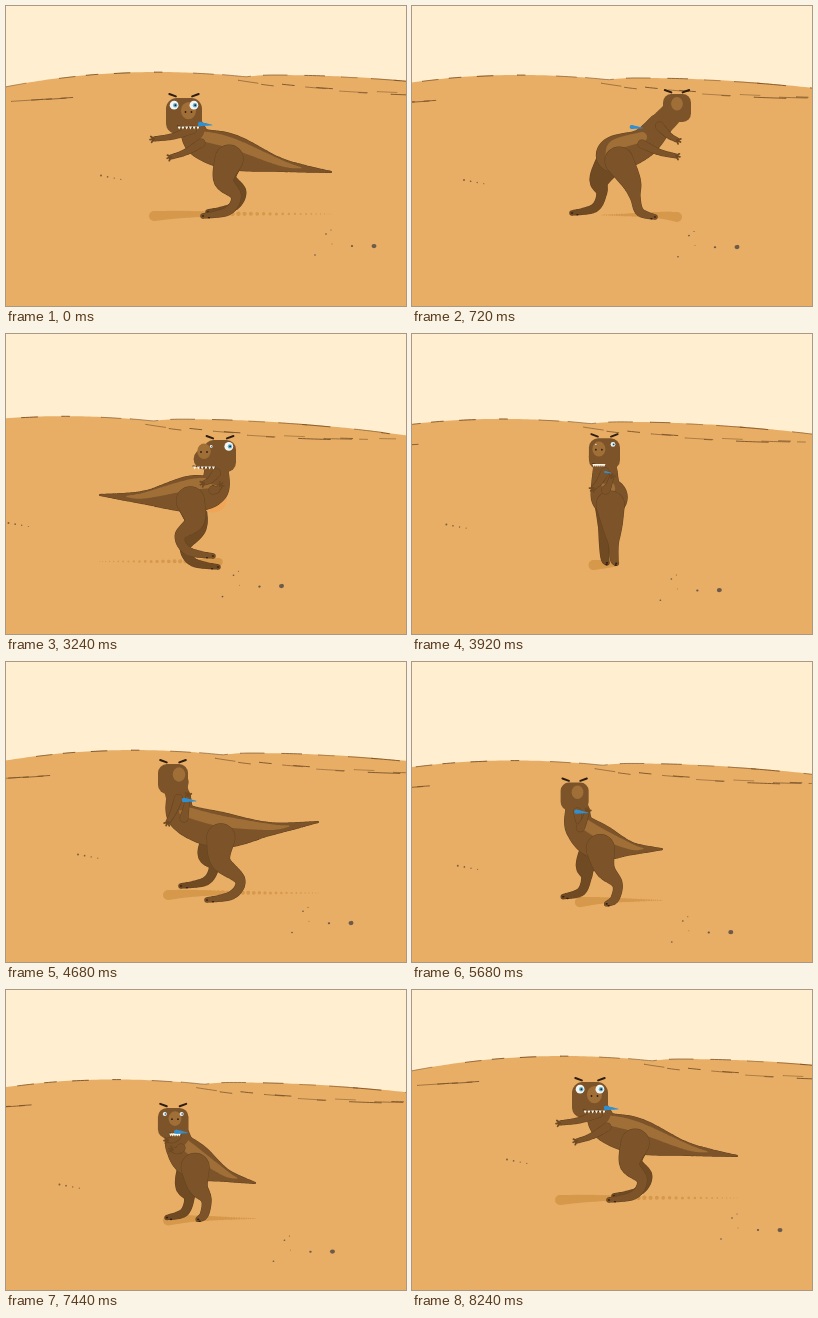
Recreate the animation shown at these times as an HTML page with a canvas. Size 400x300 px, loop 8280 ms.

```html
<!DOCTYPE html>
<html lang="en">
<head>
<meta charset="utf-8">
<title>Dinosaur in the desert</title>
<style>
html,body{margin:0;width:100%;height:100%;overflow:hidden;background:#ffeed0}
canvas{display:block;width:400px;height:300px}
</style>
</head>
<body>
<canvas id="stage" width="400" height="300"></canvas>
<script>
const LOOP = 8280, STEP = 40;
const ctx = document.getElementById('stage').getContext('2d');
const C = {sky:'#ffeed0', sand:'#e8ae66', shade:'#d6994b', ink:'#63421f', skin:'#7d5429',
  dark:'#704a23', light:'#a06f38', belly:'#f0a656', blue:'#2f8fd0', brow:'#2f1d10'};

// A pose holds only the free joints; the rig works out the rest.
// head: x, y, size. feet: toe x, y, facing. gaze: how open each eye is. pan: camera shift.
const faceLeft = {tail:[325,166], hip:[225,146], chest:[195,137], head:[178,110,18], look:[.25],
  near:[197,210,-1], far:[202,206,-1], hands:[148,133,165,151], bite:[200,118,1],
  gaze:[1,1], belly:[0], pan:[0,0]};
const turned = {tail:[190,150], hip:[203,148], chest:[230,138], head:[265,102,14], look:[0],
  near:[243,211,.6], far:[160,207,-.9], hands:[265,134,264,150], bite:[225,121,.9],
  gaze:[0,0], belly:[1], pan:[-43,1]};
const faceRight = {tail:[95,166], hip:[192,149], chest:[222,141], head:[226,112,15], look:[-.8],
  near:[219,214,1], far:[214,208,1], hands:[255,138,238,150], bite:[215,123,1],
  gaze:[0,0], belly:[0], pan:[-87,-3]};
const lookBack = {tail:[94,161], hip:[183,160], chest:[207,156], head:[214,122,16], look:[-1],
  near:[207,222,1], far:[212,233,1], hands:[198,149,214,152], bite:[206,138,0],
  gaze:[.3,1], belly:[8], pan:[-92.5,12]};
const neckUp = {tail:[312,160], hip:[215,168], chest:[178,156], head:[167,117,15], look:[.4],
  near:[201,238,-1], far:[175,224,-1], hands:[162,160,182,134], bite:[184,138,1],
  gaze:[0,0], belly:[0], pan:[-23,21]};
const rear = {tail:[184,216], hip:[157,192], chest:[158,176], head:[158,153,13], look:[0],
  near:[188,246,.4], far:[126,246,-.4], hands:[174,165,168,167], bite:[155,162,.9],
  gaze:[0,0], belly:[0], pan:[-77,40]};
const keys = [[0,faceLeft],[720,turned],[2160,faceRight],[3240,lookBack],[4680,neckUp],[6720,rear],[8240,faceLeft]];

const mix = (a, b, u) => a + (b - a) * u;
const between = (p, q, u) => [mix(p[0], q[0], u), mix(p[1], q[1], u)];
const move = (p, x, y) => [p[0] + x, p[1] + y];
const ease = u => u * u * (3 - 2 * u);

function poseAt(t) {
  const i = Math.max(1, keys.findIndex(k => k[0] > t)), end = t >= 8240 ? keys.length - 1 : i;
  const [t0, a] = keys[end - 1], [t1, b] = keys[end];
  const u = ease(Math.min(1, (t - t0) / (t1 - t0))), pose = {};
  for (const k in a) pose[k] = a[k].map((v, j) => mix(v, b[k][j], u));
  return pose;
}

function curve(a, b, c, d, u) {
  return b + u * (c - a + u * (2 * a - 5 * b + 4 * c - d + u * (3 * (b - c) + d - a))) / 2;
}
// Smooth tapered shape along joints, one radius for each joint.
function limb(joints, radii, fill, edge) {
  const rows = joints.map((p, i) => [p[0], p[1], radii[i]]), last = rows.length - 1;
  const spots = [];
  for (let i = 0; i < last; i++) {
    const quad = [rows[Math.max(0, i - 1)], rows[i], rows[i + 1], rows[Math.min(last, i + 2)]];
    for (let u = 0; u <= 1; u += 1 / 24) spots.push([0, 1, 2].map(k => curve(...quad.map(r => r[k]), u)));
  }
  const stamp = (grow, color) => {
    ctx.beginPath();
    for (const [x, y, r] of spots) {
      const size = Math.max(.3, r) + grow;
      ctx.moveTo(x + size, y);
      ctx.arc(x, y, size, 0, 7);
    }
    ctx.fillStyle = color;
    ctx.fill();
  };
  if (edge) stamp(.5, edge);
  stamp(0, fill);
}
function line(points, color, width) {
  ctx.beginPath();
  for (const p of points) ctx.lineTo(...p);
  ctx.strokeStyle = color;
  ctx.lineWidth = width;
  ctx.stroke();
}
function dot([x, y], r, fill, ry = r) {
  ctx.beginPath();
  ctx.ellipse(x, y, r, ry, 0, 0, 7);
  ctx.fillStyle = fill;
  ctx.fill();
}

const hump = (x, peak, top, left, right) => top + (x < peak ? left : right) * (x - peak) ** 2;
const hill = x => hump(x, 150, 66, .00065, .0006);
const ridge = x => hump(x, 267, 69, .0025, .00032);
const skyline = x => Math.min(hill(x), ridge(x));
const slope = x => 72 + 18 * (1 - Math.exp((232 - x) / 110));
const trail = x => 95.5 - x * .065;

// Broken dark dashes scattered around a line.
function cracks(path, from, to, count, spread, seed) {
  const random = () => (seed = seed * 16807 % 2147483647) / 2147483647;
  for (let i = 0; i < count; i++) {
    const x = mix(from, to, (i + random() * .6) / count), size = 8 + random() * 28;
    const drop = random() * spread, points = [];
    for (let s = 0; s <= size; s += 4) points.push([x + s, path(x + s) + drop]);
    line(points, '#795229', .5 + random() * .5);
  }
}

function desert([dx, dy]) {
  ctx.fillStyle = C.sky;
  ctx.fillRect(0, 0, 400, 300);
  ctx.save();
  ctx.translate(dx, dy - dx * .045);
  ctx.beginPath();
  ctx.moveTo(-20, 400);
  for (let x = -20; x <= 520; x += 4) ctx.lineTo(x, skyline(x));
  ctx.lineTo(520, 400);
  ctx.fillStyle = C.sand;
  ctx.fill();
  cracks(skyline, 0, 490, 14, .6, 11);
  cracks(slope, 232, 480, 13, 3, 42);
  cracks(trail, 5, 62, 4, .8, 7);
  ctx.restore();

  const tilt = dx * .0003;
  ctx.save();
  ctx.transform(1, tilt, 0, 1, dx, dy - tilt * 368);
  for (let i = 0; i < 4; i++) dot([95 + i * 6.6, 169.5 + i * 1.3], 1 - i * .15, '#80603f');
  for (const [x, y, r] of [[368,240,2.5],[346,240,1.2],[309,249,.9],[320,228,.9],[325,224,.6],[326,238,.5]])
    dot([x, y], r, '#6d5a4b', r * .85);
  ctx.restore();
}

function leg(hip, [x, y, facing], fill) {
  const toe = [x, y], ankle = move(toe, -25 * facing, -5), hock = move(ankle, -8 * facing, -15);
  const knee = move(between(hip, hock, .5), 10 * facing, 6);
  limb([between(hip, knee, .25), knee, hock, ankle, toe], [14, 9.5, 5, 4, 2.2], fill, C.ink);
  for (const back of [0, 6]) dot(move(toe, -back * facing, back * .3), 1.2, C.brow, .8);
}
function arm(shoulder, hand) {
  const elbow = move(between(shoulder, hand, .5), 0, 2);
  limb([shoulder, elbow, hand], [4, 2.8, 2], C.skin, C.ink);
  const aim = Math.atan2(hand[1] - elbow[1], hand[0] - elbow[0]);
  for (const turn of [-.8, 0, .8])
    line([hand, move(hand, 4 * Math.cos(aim + turn), 4 * Math.sin(aim + turn))], C.dark, 1.8);
}
function eye(at, r) {
  if (r < .3) return;
  dot(at, r, '#f4f6f4');
  dot(move(at, r * .25, 0), r * .5, '#68b4d5');
  dot(move(at, r * .3, 0), r * .22, '#182a36');
}
function teeth(center, width) {
  if (width < 4) return;
  line([move(center, -width, 0), move(center, 0, 1.5), move(center, width, 1)], '#3f2815', 1.2);
  ctx.fillStyle = '#fff8e8';
  for (let u = -.85; u < .9; u += .34) {
    const [x, y] = move(center, u * width, .4);
    ctx.beginPath();
    ctx.moveTo(x - 1.5, y);
    ctx.lineTo(x + 1.7, y);
    ctx.lineTo(x, y + 3);
    ctx.fill();
  }
}
function face(p, snout) {
  const [x, y, size] = p.head;
  [-1, 1].forEach((side, i) => {
    eye([x + side * size * .55, y - size * .6], p.gaze[i] * 4.4);
    const brow = [x + side * size * .62, y - size - 3];
    line([move(brow, -side * 3, 1.4), move(brow, side * 3.5, -1)], C.brow, 2);
  });
  if (p.gaze[1] > .3) for (const side of [-3, 3]) dot(move(snout, side, -4), .9, C.brow);
  teeth(move(snout, 0, 10), 11 * p.gaze[1]);
}

function dinosaur(p) {
  const {tail, hip, chest, head} = p, size = head[2];
  const rump = move(between(tail, hip, .5), 0, 3), neck = between(chest, head, .5);
  const snout = move(head, p.look[0] * size, 0), ground = (p.near[1] + p.far[1]) / 2;
  const belly = move(between(hip, chest, .75), p.belly[0], 11);
  const lit = (joint, up) => move(joint, 0, -up);

  limb([[tail[0], ground], [p.near[0], ground], [p.hands[0], ground + 2]], [.5, 3, 5], C.shade);
  leg(hip, p.far, C.dark);
  limb([hip, belly, neck], [5, 7 + p.belly[0] * .4, 8], C.belly);
  limb([tail, rump, hip, chest, neck], [.6, 6.5, 17.5, 14.5, 12], C.skin, C.ink);
  limb([between(tail, rump, .6), lit(rump, 2), lit(hip, 9), lit(chest, 7)], [.6, 3, 5.5, 5], C.light);
  leg(hip, p.near, C.skin);

  limb([neck, head], [12, size * .8], C.skin);
  ctx.beginPath();
  ctx.roundRect(head[0] - size, head[1] - size, size * 2, size * 2, size * .6);
  ctx.fillStyle = C.skin;
  ctx.fill();
  limb([head, move(snout, 0, 3)], [size * .7, size * .65], C.skin);
  dot(move(snout, 0, -size * .3), size * .42, C.light, size * .48);
  arm(neck, p.hands.slice(0, 2));
  arm(chest, p.hands.slice(2));
  face(p, snout);
  const [bx, by, bite] = p.bite;
  if (bite > .1) limb([[bx - 6 * bite, by], [bx + 6 * bite, by + 1]], [2.2 * bite, .4], C.blue);
}

ctx.lineCap = ctx.lineJoin = 'round';
const start = performance.now();
function draw(now) {
  const t = Math.floor(Math.max(0, now - start) % LOOP / STEP) * STEP, pose = poseAt(t);
  desert(pose.pan);
  dinosaur(pose);
  requestAnimationFrame(draw);
}
draw(start);
</script>
</body>
</html>
```
